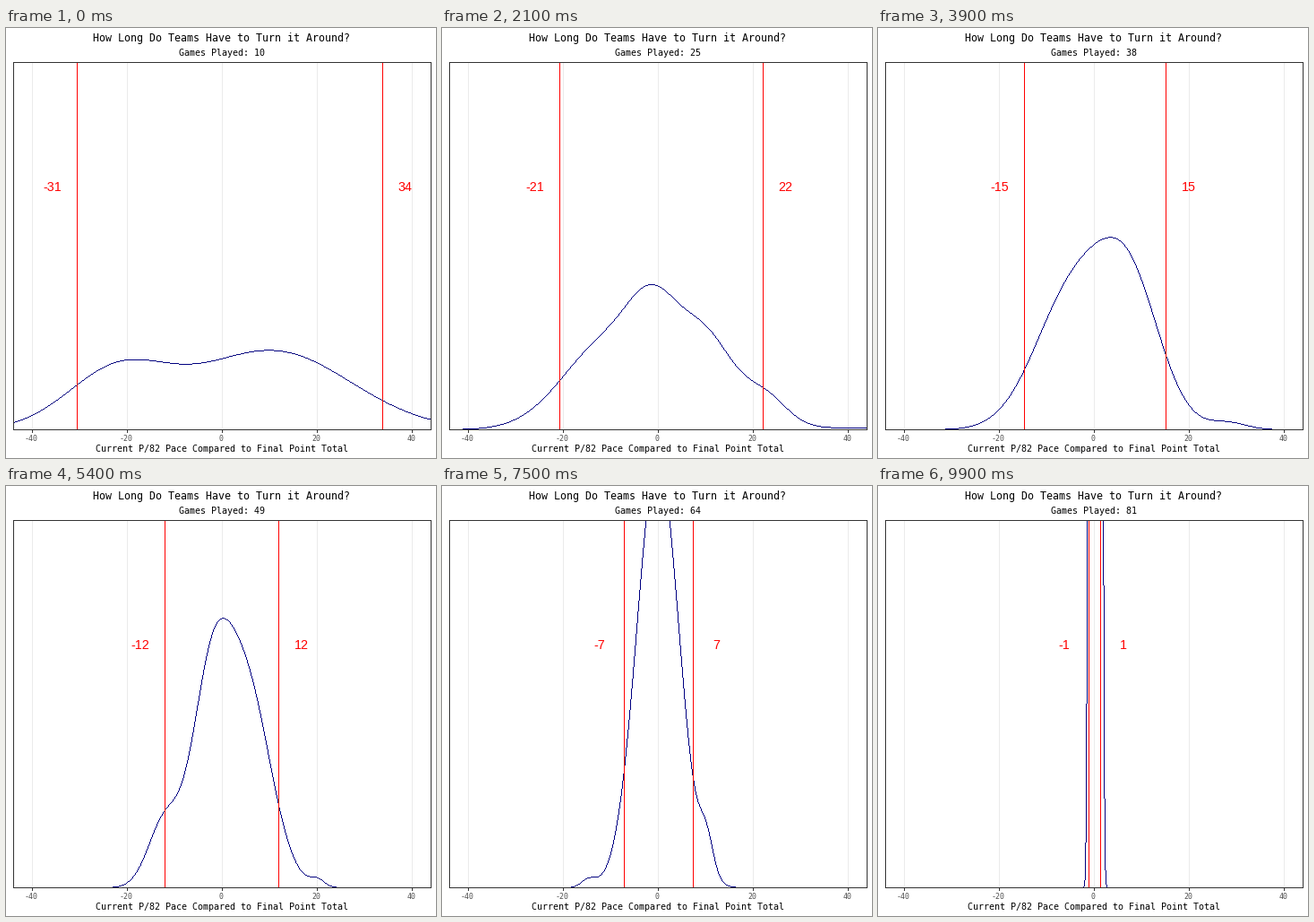
These frames come from a looping animation (480 by 480 pixels, 10 s). A matplotlib script:

```python
import matplotlib.pyplot as plt
import numpy as np
from matplotlib.animation import FuncAnimation
from matplotlib.patches import Rectangle

plt.rcParams["path.simplify"] = False

SIZE, DPI = 480, 96
PX = 72 / DPI                      # one pixel in points
FRAMES, INTERVAL = 100, 100
LEFT, RIGHT, TOP, BASE = 8, 474, 38, 448
ZERO, UNIT = 240.5, 5.3            # pixel of value 0, pixels per point
FIRST_GAME, LAST_GAME = 10, 81
DARK, GRID, CURVE, RED = "#333333", "#ebebeb", "#000080", "#ff0000"
MONO = "DejaVu Sans Mono"

# step: (low limit, high limit, bells as (centre, deviation, height))
KEYS = {
    0: (-30.55, 33.85, [(-22, 10.6, 63), (10.5, 16.5, 88)]),
    13: (-25.2, 25.8, [(-15, 11, 66), (-1.7, 6.1, 123),
                       (11, 6.2, 78), (27, 5, 34)]),
    29: (-16.1, 18.4, [(-6.8, 7.7, 148), (9.3, 7.3, 130), (36, 7, 5)]),
    39: (-14.6, 15.2, [(-4.5, 7.9, 150), (7.5, 6.6, 150), (28, 4, 8)]),
    54: (-12, 12, [(-12.2, 3.4, 70), (-2.4, 4.2, 206),
                   (5.3, 5.1, 215), (20, 1.5, 8)]),
    75: (-7.07, 7.45, [(-14.5, 1.5, 9), (0, 4.4, 480), (10.2, 1.5, 40)]),
    99: (-1.04, 1.42, [(-1, 0.28, 1000), (0.33, 0.6, 1500),
                       (1.65, 0.28, 1000)]),
}
STEPS = list(KEYS)
LOWS, HIGHS, BELLS = zip(*KEYS.values())


def to_px(value):
    return ZERO + UNIT * value


def shape(n, u):
    """Density n over limits mapped to -1..1, scaled to constant area."""
    half = (HIGHS[n] - LOWS[n]) / 2
    x = (HIGHS[n] + LOWS[n]) / 2 + half * u
    return half * sum(h * np.exp(-((x - c) / s) ** 2 / 2)
                      for c, s, h in BELLS[n])


def density(i, low, high, x):
    n = min(np.searchsorted(STEPS, i, side="right") - 1, len(STEPS) - 2)
    w = (i - STEPS[n]) / (STEPS[n + 1] - STEPS[n])
    half = (high - low) / 2
    u = (x - (high + low) / 2) / half
    return ((1 - w) * shape(n, u) + w * shape(n + 1, u)) / half


fig = plt.figure(figsize=(SIZE / DPI, SIZE / DPI), dpi=DPI, facecolor="white")
ax = fig.add_axes([0, 0, 1, 1])
ax.set(xlim=(0, SIZE), ylim=(SIZE, 0))
ax.axis("off")


def write(x, baseline, text, size, color="black", font=MONO):
    return ax.text(x, baseline, text, fontsize=size * PX, color=color,
                   family=font, ha="center", va="baseline", zorder=5)


def stroke(x, y, color, z):
    return ax.plot(x, y, color=color, lw=PX, zorder=z, antialiased=False,
                   solid_capstyle="butt")[0]


for tick in range(-40, 41, 20):
    x = to_px(tick)
    stroke([x, x], [TOP, BASE], GRID, 1)
    stroke([x, x], [BASE, BASE + 3], DARK, 1)
    write(x, 461, str(tick), 8.3, "#4d4d4d")

panel = Rectangle((LEFT, TOP), RIGHT - LEFT, BASE - TOP, fill=False,
                  ec=DARK, lw=PX, zorder=4, antialiased=False)
ax.add_patch(panel)

write(240.5, 15.5, "How Long Do Teams Have to Turn it Around?", 11.63)
write(241, 473, "Current P/82 Pace Compared to Final Point Total", 9.97)
games = write(241, 31, "", 9.97)

# The curve is one crisp vertical run of pixels per column.
edges = np.arange(LEFT, RIGHT + 1)
values = (edges - 0.5 - ZERO) / UNIT
columns = np.repeat(edges[:-1] + 0.5, 3)
curve = stroke(columns, np.full(columns.shape, BASE), CURVE, 2)
curve.set_snap(False)
curve.set_clip_path(panel)

limits = [stroke([0, 0], [TOP, BASE], RED, 3) for _ in range(2)]
labels = [write(0, 181.5, "", 14.3, RED, "Liberation Sans") for _ in limits]


def update(i):
    low, high = (np.interp(i, STEPS, ends) for ends in (LOWS, HIGHS))

    rows = np.floor(BASE + 0.5 - density(i, low, high, values))
    top = np.minimum(rows[:-1], rows[1:])
    bottom = np.maximum(np.maximum(rows[:-1], rows[1:]), top + 1)
    gap = np.full_like(top, np.nan)
    curve.set_ydata(np.column_stack([top, bottom, gap]).ravel())

    for line, label, value, side in zip(limits, labels, (low, high), (-1, 1)):
        line.set_xdata([to_px(value)] * 2)
        label.set_x(to_px(value + 5 * side) - 0.5)
        label.set_text(f"{round(value)}")

    played = FIRST_GAME + i * (LAST_GAME - FIRST_GAME) / (FRAMES - 1)
    games.set_text(f"Games Played: {round(played)}")
    return [curve, games, *limits, *labels]


anim = FuncAnimation(fig, update, frames=FRAMES, interval=INTERVAL,
                     repeat=True, repeat_delay=0)
plt.show()
```
